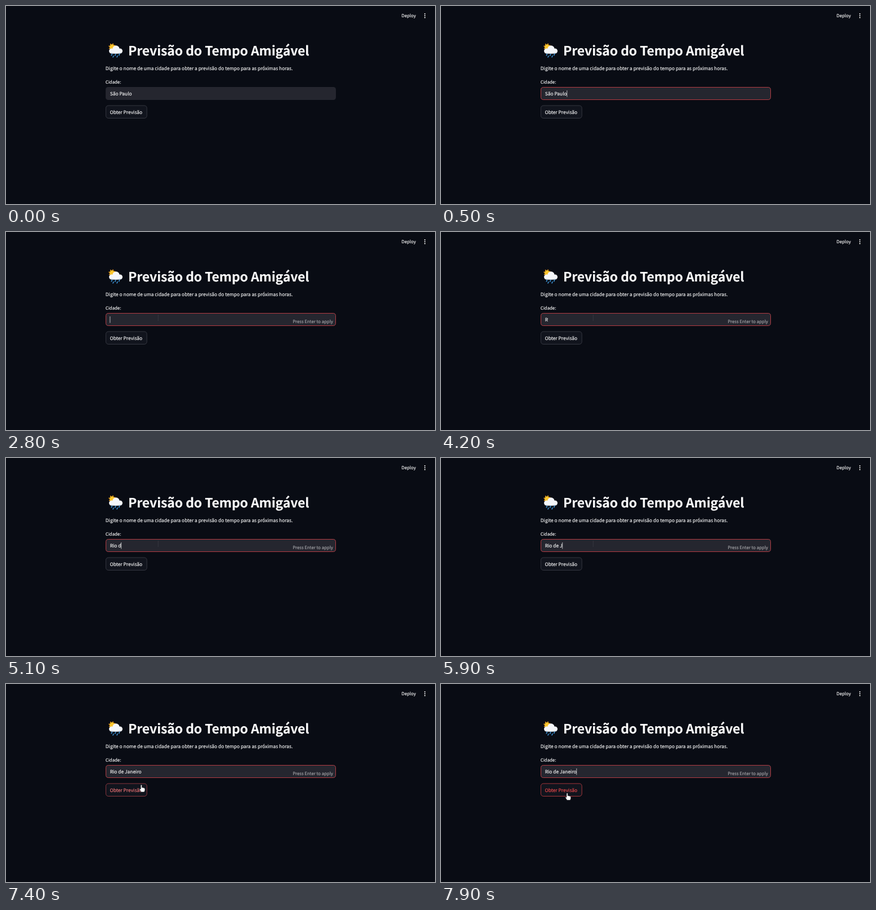
Recreate the animation shown at these times as an HTML page. Size 762x352 px, loop 8 s.

```html
<!DOCTYPE html>
<html lang="pt">
<head>
<meta charset="utf-8">
<title>Previsão do Tempo</title>
<style>
  html, body { margin: 0; width: 100%; height: 100%; overflow: hidden; background: #090c14; }
  svg { display: block; width: 100vw; height: 100vh; }
  text {
    font: 8.41px "Noto Sans CJK JP", "Noto Sans CJK SC", "Noto Sans CJK", "Noto Sans", sans-serif;
    fill: #fafafa; stroke: #fafafa; stroke-width: .14px;
    white-space: pre; text-rendering: geometricPrecision;
  }
  text.small { font-size: 7.75px; }
  text.title { font-size: 23px; font-weight: 700; letter-spacing: -.005em; }
</style>
</head>
<body>
<svg viewBox="0 0 762 352">
  <text class="small" x="702.6" y="20.2">Deploy</text>
  <g fill="#fafafa">
    <circle cx="744" cy="14" r="1.05"/><circle cx="744" cy="17.3" r="1.05"/><circle cx="744" cy="20.6" r="1.05"/>
  </g>

  <g id="weather" transform="translate(-.8 -.6)">
    <circle cx="189.3" cy="73.3" r="5.1" fill="none" stroke="#f6a21c" stroke-width="2.2" stroke-dasharray="1.7 2.3"/>
    <circle cx="189.3" cy="73.3" r="4.5" fill="#fcc52c"/>
    <g fill="#f4f6f9">
      <circle cx="188.4" cy="80.6" r="4.6"/><circle cx="196.2" cy="77.2" r="6.3"/>
      <circle cx="203.2" cy="80.6" r="4.6"/><rect x="188" y="79" width="15.5" height="6.2"/>
    </g>
    <path d="M186 84.2Q196 86 205.5 84" fill="none" stroke="#cfd6df" stroke-width="1"/>
    <path d="M189.2 86l-1.1 2.4M195.6 86.3l-1.1 2.4M202.6 85.8l-1.1 2.4M191.8 89.4l-1 2.2M198.8 89.2l-1 2.2"
      stroke="#3b8fd0" stroke-width="1.6" stroke-linecap="round"/>
  </g>

  <text class="title" x="217" y="87.6">Previsão do Tempo Amigável</text>
  <text x="176.8" y="114.4">Digite o nome de uma cidade para obter a previsão do tempo para as próximas horas.</text>
  <text class="small" x="176.8" y="138">Cidade:</text>

  <rect x="177" y="144" width="409" height="23" rx="4.6" fill="#25262f"/>
  <rect id="focus" x="177.5" y="144.5" width="408" height="22" rx="4.2" fill="none" stroke="#b33c43"/>
  <text id="city" x="184.7" y="159"></text>
  <rect id="caret" y="150" width=".9" height="11.6" fill="#fafafa" fill-opacity=".75"/>
  <text id="hint" class="small" x="580.9" y="161.9" text-anchor="end" opacity=".6">Press Enter to apply</text>

  <rect id="button" x="177.4" y="177" width="72.8" height="22.5" rx="4.4" fill="#11141d" stroke="#3f424b" stroke-width=".8"/>
  <text id="label" x="184.4" y="191.6">Obter Previsão</text>

  <g id="mouse">
    <path id="beam" d="M0-5.5V5.5" stroke="#3b3c45" stroke-width=".8"/>
    <path id="arrow" d="M0 0V11L2.6 8.6 4.4 12.4 6 11.6 4.3 8H7.8Z" fill="#fff" stroke="#111" stroke-width=".5"/>
    <path id="hand" d="M-1.2.8Q0-.8 1 .8V5Q2.4 4 3.2 5.4Q4.5 4.6 5.1 6Q6.2 5.6 6.4 7V9.6Q6 11.5 5 12.8H-.4Q-1.6 10.4-3.4 8Q-3.5 6.5-1.2 7.6Z"
      fill="#fff" stroke="#15171c" stroke-width=".6"/>
  </g>
</svg>
<script>
const LOOP = 8000, STEP = 100;
const el = Object.fromEntries([...document.querySelectorAll('[id]')].map(e => [e.id, e]));

// [time, field text, caret visible]
const typing = [
  [0, 'São Paulo', 0], [400, 'São Paulo', 1], [800, 'São Paulo', 0], [1100, 'São Paulo', 1],
  [1500, 'São Pau', 1], [1700, 'São Pa', 1], [1800, 'São P', 1], [1900, 'São ', 1], [2000, 'São', 1],
  [2300, 'Sã', 1], [2500, 'S', 1], [2800, '', 1], [3100, '', 0],
  [3500, 'R', 1], [4200, 'R', 0], [4600, 'Ri', 1], [4800, 'Rio', 1], [5000, 'Rio ', 1], [5100, 'Rio d', 1],
  [5300, 'Rio de', 1], [5500, 'Rio de ', 1], [5900, 'Rio de J', 1], [6300, 'Rio de Jan', 1],
  [6500, 'Rio de Jane', 1], [6600, 'Rio de Janeir', 1], [6700, 'Rio de Janeiro', 1],
  [7200, 'Rio de Janeiro', 0], [7700, 'Rio de Janeiro', 1]
];

const clamp = v => Math.min(1, Math.max(0, v));
const mix = (a, b, k) => a + (b - a) * k;
const show = (e, on) => e.setAttribute('visibility', on ? 'visible' : 'hidden');
const rgb = (a, b, k) => `rgb(${a.map((v, i) => Math.round(mix(v, b[i], k)))})`;

function draw(t) {
  const [, text, caretOn] = typing.findLast(([start]) => start <= t);
  el.city.textContent = text;
  el.caret.setAttribute('x', 184.4 + (text ? el.city.getComputedTextLength() : 0));
  show(el.caret, caretOn);
  show(el.hint, t >= 1500);
  el.focus.style.opacity = clamp((t - 300) / 200);

  const p = clamp((t - 6950) / 750), k = p * p * (3 - 2 * p);
  const y = mix(152.5, 193.8, k);
  el.mouse.setAttribute('transform', `translate(${mix(270.3, 224.2, k)} ${y})`);
  show(el.beam, t >= 1100 && y < 167);
  show(el.arrow, y >= 167 && y < 177);
  show(el.hand, y >= 177);

  const hover = y >= 177 ? clamp((t - 7250) / 200) : 0;
  el.button.style.stroke = rgb([63, 66, 75], [205, 64, 69], hover);
  el.label.style.fill = el.label.style.stroke = rgb([250, 250, 250], [240, 74, 76], hover);
}

function frame() {
  draw(Math.floor(performance.now() % LOOP / STEP) * STEP);
  requestAnimationFrame(frame);
}
frame();
</script>
</body>
</html>
```
